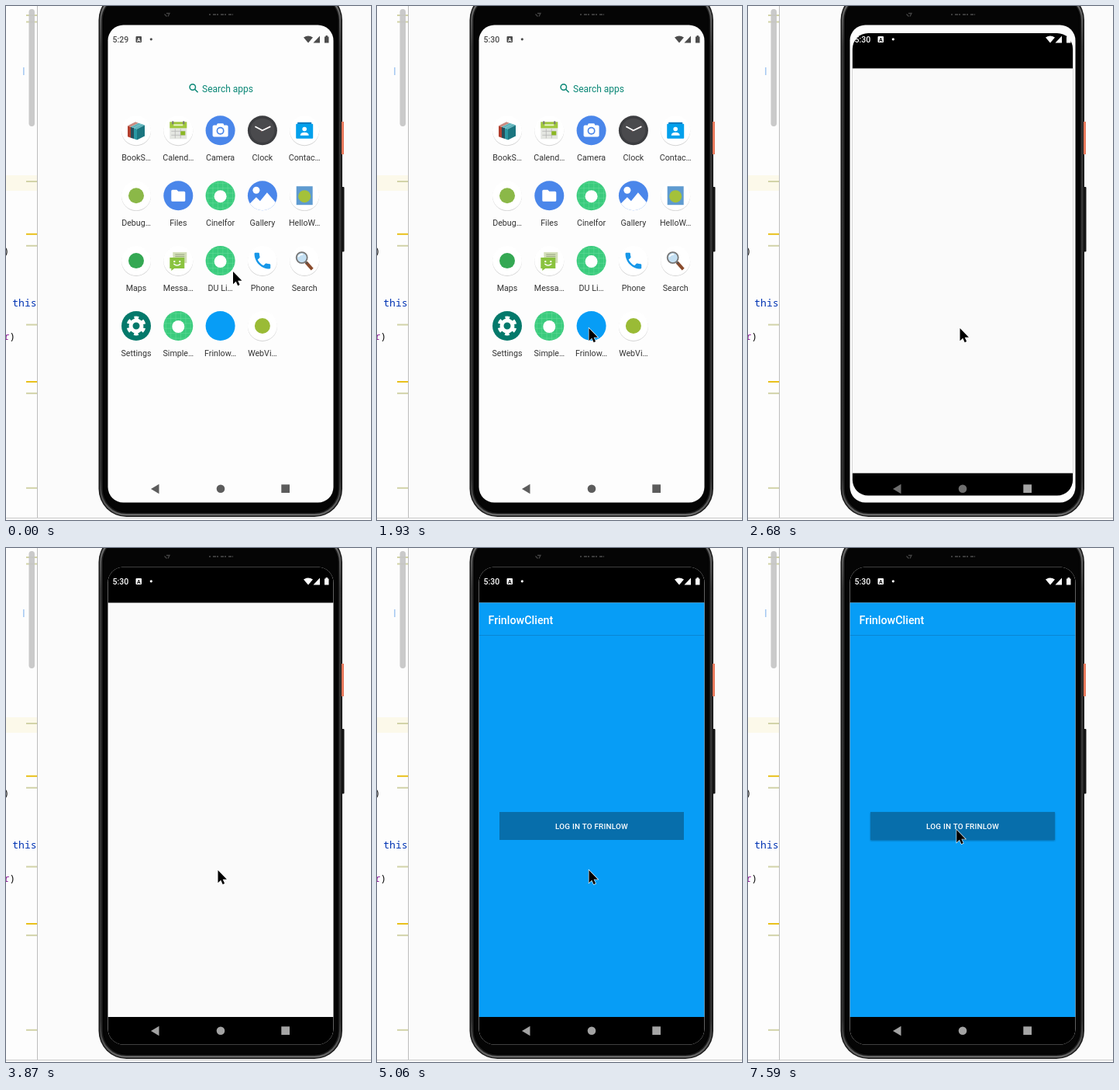
Animation, 471 px wide and 662 px high, one loop 8000 ms. Source, as an HTML page:

```html
<!DOCTYPE html>
<html lang="en">
<head>
<meta charset="utf-8">
<title>Launching an app on a phone emulator</title>
<style>
  html, body { margin: 0; width: 100%; height: 100%; overflow: hidden; background: #fbfbfb; }
  svg { display: block; width: 471px; height: 662px; font-family: Roboto, sans-serif; }
  .code { font: 13px "Noto Sans Mono", "DejaVu Sans Mono", monospace; }
  .label { font-size: 10.7px; fill: #333; text-anchor: middle; }
  .title { font-size: 14.3px; font-weight: 500; fill: #fff; }
  .login { font-size: 9.9px; font-weight: 500; fill: #fff; text-anchor: middle; letter-spacing: .22px; }
</style>
</head>
<body>
<svg viewBox="0 0 471 662">
  <defs>
    <clipPath id="screen"><rect x="131.5" y="24.5" width="291" height="615" rx="20"/></clipPath>
    <clipPath id="disc"><circle r="19"/></clipPath>
    <linearGradient id="rim" x2="0" y2="1">
      <stop offset="0" stop-color="#777"/>
      <stop offset=".1" stop-color="#383838"/>
      <stop offset=".93" stop-color="#303030"/>
      <stop offset="1" stop-color="#666"/>
    </linearGradient>
  </defs>

  <!-- editor strip -->
  <rect width="471" height="662" fill="#fbfbfb"/>
  <rect width="40" height="659" fill="#fdfdfd"/>
  <rect y="218" width="40" height="20" fill="#fcf9ea"/>
  <g id="stripes"></g>
  <rect x="29.5" y="4" width="7.5" height="151" rx="3.7" fill="#c6c6c6" fill-opacity=".92"/>
  <rect x="22" y="79" width="1.6" height="10" fill="#a9cbf2"/>
  <g class="code">
    <text x="-3.5" y="320" fill="#111">)</text>
    <text x="8.3" y="387" fill="#0033b3">this</text>
    <text x="-3.5" y="430" fill="#871094">r</text>
    <text x="4.3" y="430" fill="#111">)</text>
  </g>
  <path d="M40.5 0V659" stroke="#bdbdbd"/>
  <path d="M0 659.5H471" stroke="#c9c9c9"/>

  <!-- phone body -->
  <rect x="119.5" y="-18" width="314.5" height="676" rx="36" fill="#161616"/>
  <rect x="122.2" y="-15" width="309" height="670.2" rx="33" fill="none" stroke="url(#rim)" stroke-width="2.4"/>
  <rect x="125.5" y="-12" width="302.5" height="664" rx="30" fill="#050505" stroke="#000"/>
  <rect x="433" y="149" width="3" height="42" fill="#e8795c"/>
  <rect x="433" y="233" width="3.5" height="83.5" rx="1" fill="#141414"/>
  <path d="M204.5 10.5l3 3M207 9.5h4l-2 4" fill="none" stroke="#444" stroke-width="1.3"/>
  <path d="M262 11H293" stroke="#3a3a3a" stroke-width="2" stroke-dasharray="2 3 4 1"/>

  <g clip-path="url(#screen)">
    <rect x="131" y="24" width="292" height="616" fill="#fdfdfd"/>
    <g id="apps">
      <g fill="none" stroke="#0a8776" stroke-width="1.5">
        <circle cx="240.8" cy="104.5" r="3.7"/>
        <path d="M243.6 107.3l4 4"/>
      </g>
      <text x="253" y="110.7" font-size="12" fill="#0a8776">Search apps</text>
    </g>
    <g id="win">
      <rect id="frame" fill="#000"/>
      <rect id="pane" fill="#fafafa"/>
    </g>
    <g id="client">
      <rect x="131.5" y="70.5" width="291" height="533.5" fill="#079df6"/>
      <path d="M131.5 112.5H422.5" stroke="#0a86d3"/>
      <text class="title" x="143.5" y="97.5">FrinlowClient</text>
      <rect id="button" x="158" y="340" width="238" height="36" fill="#076eab"/>
      <text class="login" x="277" y="362">LOG IN TO FRINLOW</text>
    </g>
    <g id="status">
      <text id="time" x="137.5" y="47" font-size="10.5" font-weight="500"></text>
      <rect x="167.5" y="39" width="7.5" height="8" rx="1"/>
      <text id="badge" x="171.25" y="45.8" font-size="7" font-weight="700" text-anchor="middle">A</text>
      <circle cx="187.3" cy="42.8" r="1.6"/>
      <path d="M390 47.5L384 40.5Q390 36.5 396 40.5ZM405 38.5V47.5H396.5ZM411 39.5H412.5V38H415V39.5H416.5V47.5H411Z"/>
    </g>
    <g id="nav">
      <path d="M187 622L197.5 615.8V628.2Z"/>
      <circle cx="277" cy="621.8" r="5.3"/>
      <rect x="355.3" y="616.3" width="10.7" height="10.7"/>
    </g>
  </g>
  <path id="cursor" d="M0 0V16.2L3.7 12.7L6.2 18.2L8.6 17.1L6.2 11.7H11.4Z" stroke="#fff" stroke-width="1.2" paint-order="stroke"/>
</svg>

<script>
const $ = id => document.getElementById(id);
const rect = (x, y, w, h, fill, rx = 0) =>
  `<rect x="${x}" y="${y}" width="${w}" height="${h}" rx="${rx}" fill="${fill}"/>`;
const circle = (x, y, r, fill) => `<circle cx="${x}" cy="${y}" r="${r}" fill="${fill}"/>`;
const line = (d, stroke, w) => `<path d="${d}" fill="none" stroke="${stroke}" stroke-width="${w}"/>`;
const fill = (d, color) => `<path d="${d}" fill="${color}"/>`;

// editor marks
for (const y of [12, 20.5, 226, 293.8, 308.8, 410.5, 484, 498.8, 620.8]) {
  const warn = y === 293.8 || y === 484;
  $('stripes').innerHTML += rect(26, y - 1, 14, 2, warn ? '#e9c11c' : '#d2d3a8');
}

// icons, each centred on 0,0
const disc = color => circle(0, 0, 19, color);
const plate = circle(0, 0.9, 19, '#d4d4d4') + circle(0, 0, 19, '#fff');
const dot = color => plate + circle(0, 0, 10, color);

function grid() {
  let d = '';
  for (let i = -16; i <= 16; i += 6.4) d += `M${i} -19V19M-19 ${i}H19`;
  return disc('#3acb7d') + `<g clip-path="url(#disc)">${line(d, '#68dc9d', 0.5)}</g>` + circle(0, 1, 8, '#fff');
}

function books() {
  const spines = ['#b3402f', '#24505c', '#2a98a3'].map((color, i) => {
    const x = -11 + i * 4, y = -6 + i * 1.4;
    return fill(`M${x} ${y}l4 1.4v14l-4 -1.4Z`, color) + fill(`M${x} ${y}l10 -5l4 1.4l-10 5Z`, i ? '#5fb3bb' : '#c98b80');
  });
  return plate + spines.join('') + fill('M1 -1.8L11 -6.8V7.2L1 12.2Z', '#1b7680');
}

const calendar = plate + rect(-11, -11, 22, 22, '#e4e6e1') + rect(-11, -11, 22, 8, '#a0c83c')
  + rect(-8, -12, 2, 4, '#777') + rect(6, -12, 2, 4, '#777') + rect(-6, -8, 12, 2, '#e9f4c8')
  + line('M-9 1H9M-9 6H9M-4 -2V10M3 -2V10', '#b4b4b4', 0.8) + rect(3, 1, 6, 5, '#8cb824');

const camera = disc('#4a86ea') + rect(-4.5, -9, 9, 5, '#fff', 1.5) + rect(-10, -6.8, 20, 15, '#fff', 2)
  + circle(0, 0.5, 5, '#4a86ea') + circle(0, 0.5, 3.3, '#fff');

const clock = disc('#3c3d40') + circle(0, 0, 15.5, '#4a4a4d')
  + line('M-2 1L10 -5.5', '#d98a85', 0.8) + line('M-9.500 -5L0 0L10.500 -5', '#fff', 1.7);

const contacts = plate + rect(-9, -10.5, 18, 4, '#0277bd') + rect(-11, -8.5, 22, 19, '#03a0ec', 1)
  + circle(0, -1.8, 2.8, '#fff') + fill('M-5.5 6.5Q-5.5 2.5 0 2.5T5.5 6.5Z', '#fff');

const files = disc('#4a86ea')
  + fill('M-7.500 -7.500H-2L0 -5.500H7.500Q9 -5.500 9 -4V6Q9 7.500 7.500 7.500H-7.500Q-9 7.500 -9 6V-6Q-9 -7.500 -7.500 -7.500Z', '#fff');

const gallery = disc('#4a86ea') + circle(-8, -7, 4.5, '#fff')
  + `<g clip-path="url(#disc)">${fill('M-19 13L-8 2L-3 7L6 -4L19 11V19H-19Z', '#fff')}</g>`;

const messages = plate + rect(-7, -11, 18, 14, '#d3deb9') + line('M-4 -8H8M-4 -5.500H8', '#94a47c', 1)
  + fill('M-11 -4H8V10H-5L-9 13V10H-11Z', '#8ac33f')
  + circle(-5, 1, 1.2, '#fff') + circle(2, 1, 1.2, '#fff') + line('M-6 4Q-1.500 8 3 4', '#fff', 1.3);

const phone = plate + '<g transform="scale(1.15) translate(-12 -12)">' + fill(
  'M6.6 10.8c1.4 2.8 3.8 5.1 6.6 6.6l2.2-2.2q.5-.5 1-.2 1.7.5 3.6.5 1 0 1 1V20q0 1-1 1C10.6 21 3 13.4 3 4q0-1 1-1h3.5q1 0 1 1 0 1.900.6 3.6.1.6-.3 1z',
  '#1797e8') + '</g>';

const search = plate + line('M2 2L10 11', '#8a4b2c', 4) + line('M1 1L4 4', '#555', 2)
  + '<circle cx="-3.5" cy="-4" r="7" fill="#c3dff2" stroke="#777" stroke-width="1.8"/>'
  + line('M-8 -5Q-6 -9 -2 -8', '#fff', 1.5);

// six teeth, one pointing straight up
const settings = disc('#04796b')
  + '<circle r="10.5" fill="none" stroke="#fff" stroke-width="4" stroke-dasharray="5.5 5.496" transform="rotate(15)"/>'
  + '<circle r="7" fill="none" stroke="#fff" stroke-width="5"/>';

const apps = [
  ['BookS…', books()], ['Calend…', calendar], ['Camera', camera], ['Clock', clock], ['Contac…', contacts],
  ['Debug…', dot('#8bb848')], ['Files', files], ['Cinelfor', grid()], ['Gallery', gallery],
  ['HelloW…', plate + rect(-10.5, -12, 21, 24, '#5f9bd0') + circle(0, 1, 8, '#a4c13a')],
  ['Maps', dot('#34a853')], ['Messa…', messages], ['DU Li…', grid()], ['Phone', phone], ['Search', search],
  ['Settings', settings], ['Simple…', grid()], ['Frinlow…', disc('#079df6')], ['WebVi…', dot('#9abb36')]
];
const TAPPED = 17;

apps.forEach(([name, art], i) => {
  const x = 168 + (i % 5) * 54.3, y = 160.3 + Math.floor(i / 5) * 83.9;
  $('apps').insertAdjacentHTML('beforeend',
    `<g transform="translate(${x} ${y})"><g id="icon${i}">${art}</g><text class="label" y="38.5">${name}</text></g>`);
});

const LOOP = 8000, TICK = 149, LEAD = 135;
const mix = (a, b, p) => a + (b - a) * p;
const clamp = p => Math.min(1, Math.max(0, p));
const ease = p => p * p * (3 - 2 * p);
const set = (el, attrs) => { for (const k in attrs) el.setAttribute(k, attrs[k]); };
const show = (id, on) => { $(id).style.display = on ? '' : 'none'; };

function drawCursor(n) {
  const down = ease(clamp(n / 6)), up = ease(clamp((n - 41) / 7));
  const x = mix(293, 273.5, down) - 4.3 * up - 2.5 * up * (1 - up);
  const y = mix(342, 415, down) - 52 * up;
  set($('cursor'), { transform: `translate(${x} ${y})` });
}

function drawLaunch(n) {
  const p = [0, 0.7, 0.95][n - 16] ?? 1;
  const x = mix(198, 131.5, p), y = mix(243, 24, p);
  const width = mix(158, 291, p), height = mix(209, 616, p);
  const scale = width / 291, bar = 46.5 * scale;
  const foot = Math.max(0, height - 580 * scale);
  show('win', n >= 16);
  set($('frame'), { x, y, width, height, rx: mix(26, 20, p) });
  set($('pane'), { x, y: y + bar, width, height: height - bar - foot });

  const fade = n < 16 ? 0 : mix(0.35, 1, p);
  set($('apps'), { opacity: 1 - fade, transform: `translate(0 ${n < 16 ? 0 : mix(-20.6, -45, p)})` });
  const press = { 11: 1.05, 12: 1.1 }[n] || 1;
  set($(`icon${TAPPED}`), { transform: `scale(${press})` });
}

function drawBars(n) {
  const dark = n >= 18;
  $('time').textContent = n < 11 ? '5:29' : '5:30';
  set($('status'), { fill: dark ? '#fff' : '#4c4c4c' });
  set($('badge'), { fill: dark ? '#000' : '#fff' });
  const gray = Math.round(mix(110, 163, clamp((n - 20) / 6)));
  const [back, home, recent] = $('nav').children;
  for (const el of [back, home]) set(el, { fill: dark ? `rgb(${gray},${gray},${gray})` : '#5c5c5c' });
  set(recent, { fill: dark ? '#a5a5a5' : '#5c5c5c' });
}

function drawClient(n) {
  show('client', n >= 33);
  set($('client'), { opacity: n < 34 ? 0.51 : 1 });
  const lift = 1 + 0.8 * clamp((n - 49) / 2);
  $('button').style.filter = `drop-shadow(0 ${lift * 0.8}px ${lift * 0.7}px rgba(0,0,0,.3))`;
}

const start = performance.now();
let last = -1;
function frame() {
  const t = (performance.now() - start) % LOOP;
  const n = Math.max(0, Math.floor((t - LEAD) / TICK) + 1);
  if (n !== last) {
    last = n;
    drawCursor(n);
    drawLaunch(n);
    drawBars(n);
    drawClient(n);
  }
  requestAnimationFrame(frame);
}
frame();
</script>
</body>
</html>
```
